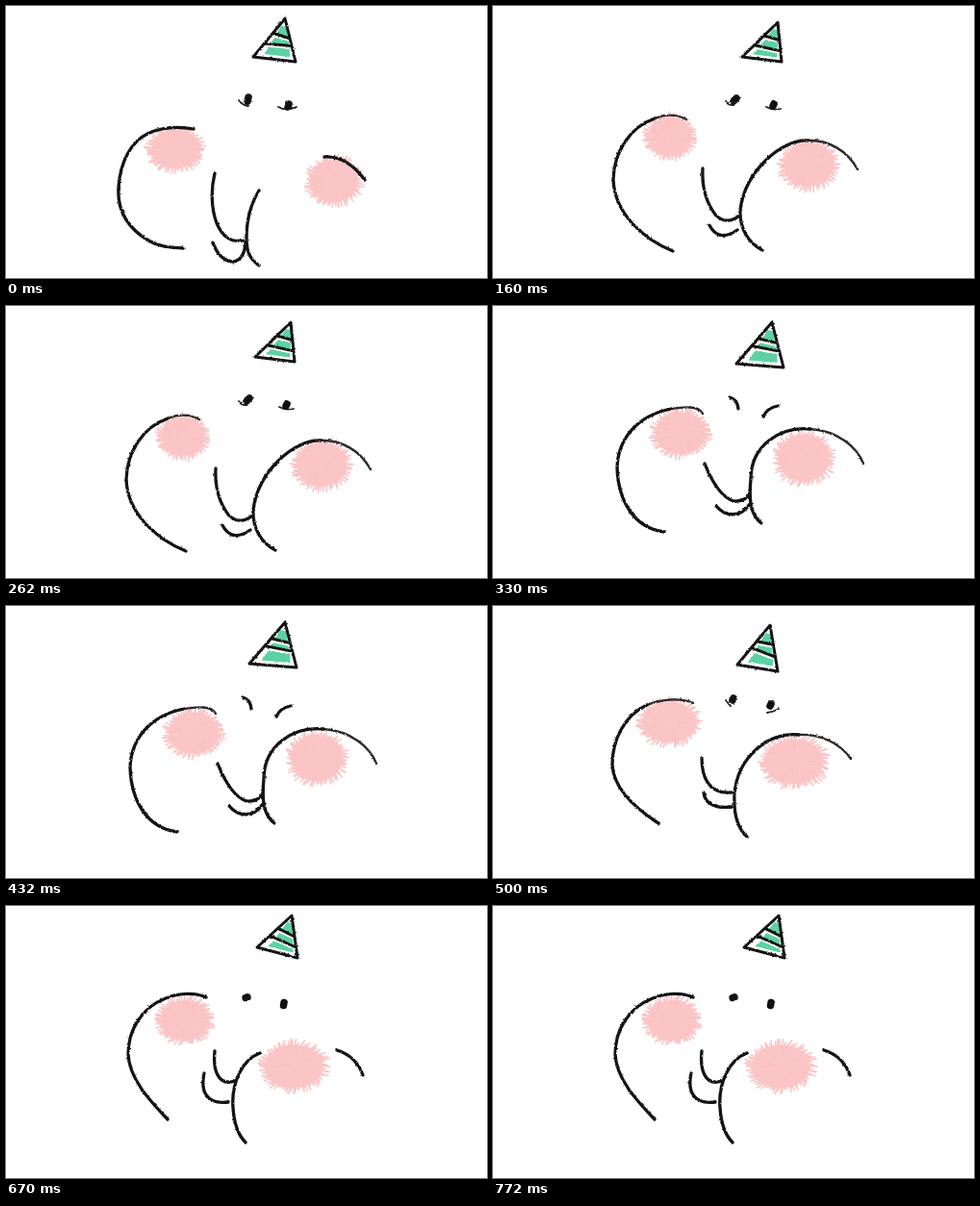
Write an HTML page that moves like this. It is 500x283 px and loops after 0.84 s.

```html
<!DOCTYPE html>
<html lang="en">
<head>
<meta charset="utf-8">
<title>Chewing cheeks</title>
<style>
  html, body { margin: 0; width: 100%; height: 100%; overflow: hidden; background: #fff; }
  svg { display: block; width: 100%; height: 100%; }
  path { fill: none; stroke-linecap: round; stroke-linejoin: round; }
  .ink { stroke: #141414; stroke-width: 3.3; }
  .thin { stroke: #2a2a2a; stroke-width: 2.4; }
  .lash { stroke: #222; stroke-width: 1.8; }
  .eye { stroke: #111; stroke-width: 7.5; }
  .hat { stroke: #141414; stroke-width: 3; }
  .green { fill: #5dd1a3; }
  .blush { fill: #fbc5c6; }
  .fur { stroke: #fbc5c6; stroke-width: 1.6; }
  .grain { stroke: #f8bcbe; stroke-width: 1; opacity: .5; }
  .pose { visibility: hidden; animation: show 840ms step-end infinite; }
  .pose:first-of-type { animation-name: show-first; }
  @keyframes show { 0% { visibility: visible; } 20.238%, 100% { visibility: hidden; } }
  @keyframes show-first { 0% { visibility: visible; } 19.048%, 100% { visibility: hidden; } }
</style>
</head>
<body>
<svg id="stage" viewBox="0 0 500 283">
  <defs>
    <filter id="rough" filterUnits="userSpaceOnUse" x="0" y="0" width="500" height="283" color-interpolation-filters="sRGB">
      <feTurbulence type="fractalNoise" baseFrequency=".4" numOctaves="2" seed="4"/>
      <feDisplacementMap in="SourceGraphic" scale="2.4" xChannelSelector="R" yChannelSelector="G"/>
    </filter>
  </defs>
</svg>
<script>
// hat: apex, left and right corner; bands: stripe ends as shares of the left and right edge
// blush: centre and radii of each cheek patch; thin: lightly pressed parts of the outline
const poses = [
  {
    hat: [[290, 13], [257, 53], [301, 58]], bands: [[.38, .46], [.65, .63]],
    blush: [[176, 149, 30, 24], [341, 182, 30, 26]],
    ink: 'M195 128C178 125 160 127 147 133C130 141 119 162 117 188C115 215 128 232 148 244C160 251 172 251 184 252' +
      'M217 174C213 190 213 210 219 226C225 240 233 246 246 244M263 192C253 208 250 224 250 242C250 258 255 264 263 270' +
      'M215 246C219 258 227 266 236 266C245 265 249 255 249 245M331 157C348 156 362 166 373 181',
    thin: '',
    eye: 'M251 99l1 -4M293 105l1 -3', lash: 'M242 98Q245 103 252 104M283 105Q291 110 302 105'
  },
  {
    hat: [[296, 17], [259, 53], [300, 58]], bands: [[.39, .45], [.66, .73]],
    blush: [[184, 136, 27, 24], [328, 165, 31, 27]],
    ink: 'M168 117C142 126 126 152 125 180C126 215 155 242 187 255' +
      'M218 169C217 188 222 205 231 217C238 225 248 225 256 218M225 228C231 240 241 242 254 233' +
      'M328 140C300 138 262 172 257 212C256 232 266 247 280 254',
    thin: 'M201 118C190 112 178 113 168 117M379 170C368 150 348 139 328 140',
    eye: 'M250 99l3 -3M291 104l1 -2', lash: 'M242 99Q245 104 250 103M284 105Q291 109 299 107'
  },
  {
    hat: [[290, 17], [253, 60], [302, 64]], bands: [[.39, .46], [.57, .64]],
    blush: [[195, 132, 31, 26], [323, 158, 32, 29]],
    ink: 'M185 107C150 114 130 138 129 168C130 202 146 231 178 235' +
      'M220 164C228 184 238 199 250 203C259 204 266 199 267 194M232 208C240 218 256 222 267 206' +
      'M330 128C300 125 268 144 268 180C266 200 267 217 279 226' +
      'M246 95Q254 97 255 107M281 115Q285 106 296 104',
    thin: 'M218 112C214 105 204 104 185 107M385 164C378 146 358 130 330 128',
    eye: '', lash: ''
  },
  {
    hat: [[288, 20], [254, 61], [296, 68]], bands: [[.41, .42], [.57, .69]],
    blush: [[183, 121, 33, 25], [313, 162, 36, 28]],
    ink: 'M160 103C136 114 124 140 124 165C125 188 144 208 172 226' +
      'M217 158C217 178 224 196 248 194M219 194C220 206 232 211 248 209' +
      'M318 134C288 130 254 156 251 196C250 215 253 230 264 240',
    thin: 'M208 101C195 95 175 97 160 103M372 159C360 142 340 133 318 134',
    eye: 'M249 98l1 -2M288 104l1 -2', lash: 'M242 98Q244 101 247 104M285 111Q292 110 297 107'
  },
  {
    hat: [[297, 10], [261, 43], [303, 54]], bands: [[.4, .5], [.63, .75]],
    blush: [[186, 119, 30, 25], [299, 167, 36, 27]],
    ink: 'M208 95C198 90 180 90 166 96C140 106 127 130 127 154C128 180 150 203 168 222' +
      'M217 151C215 170 220 188 238 182M206 174C202 192 208 207 231 204' +
      'M264 153C245 160 234 185 236 210C237 225 240 237 249 246M344 150C357 154 366 162 371 176',
    thin: '',
    eye: 'M249 95.500l2 -.6M288.500 103.500l.5 -3', lash: ''
  }
];

const NS = 'http://www.w3.org/2000/svg';
const stage = document.getElementById('stage');
let seed = 11;
const rand = () => (seed = seed * 16807 % 2147483647) / 2147483647;

function add(parent, tag, attrs) {
  const el = document.createElementNS(NS, tag);
  for (const key in attrs) el.setAttribute(key, attrs[key]);
  return parent.appendChild(el);
}
const stroke = (g, name, d) => add(g, 'path', { class: name, d });
const mix = (a, b, t) => a.map((v, i) => v + (b[i] - v) * t);
const poly = points => 'M' + points.map(p => p.map(v => v.toFixed(1)).join(' ')).join('L');

function drawBlush(g, [cx, cy, rx, ry]) {
  const at = (a, r) => [cx + Math.cos(a) * rx * r, cy + Math.sin(a) * ry * r];
  add(g, 'ellipse', { class: 'blush', cx, cy, rx: rx * .84, ry: ry * .84 });
  let fur = '', grain = '';
  for (let i = 0; i < 85; i++) {
    const a = (i + rand()) / 85 * Math.PI * 2;
    fur += poly([at(a, .7), at(a + .06, .86 + rand() * .22)]);
  }
  for (let i = 0; i < 45; i++) {
    const a = rand() * Math.PI * 2, r = Math.sqrt(rand()) * .7;
    grain += poly([at(a, r), at(a, r + .17)]);
  }
  stroke(g, 'fur', fur);
  stroke(g, 'grain', grain);
}

function drawHat(g, [top, left, right], [upper, lower]) {
  const edge = (l, r) => [mix(top, left, l), mix(top, right, r)];
  // a green band kept a little inside the outline
  const band = ([a, b], [c, d]) =>
    stroke(g, 'green', poly([mix(a, b, .22), mix(a, b, .9), mix(c, d, .88), mix(c, d, .2)]) + 'Z');
  const below = ([l, r]) => edge(l + .08, r + .08);
  band(edge(.18, .2), edge(...upper));
  band(below(upper), edge(...lower));
  band(below(lower), edge(.9, .9));
  stroke(g, 'hat', poly([top, left, right]) + 'Z' + poly(edge(...upper)) + poly(edge(...lower)));
}

poses.forEach((pose, i) => {
  const g = add(stage, 'g', { class: 'pose' });
  if (i) g.style.animationDelay = 160 + 170 * (i - 1) - 840 + 'ms';
  pose.blush.forEach(b => drawBlush(g, b));
  const lines = add(g, 'g', { filter: 'url(#rough)' });
  drawHat(lines, pose.hat, pose.bands);
  for (const name of ['thin', 'ink', 'lash', 'eye']) stroke(lines, name, pose[name]);
});
</script>
</body>
</html>
```
